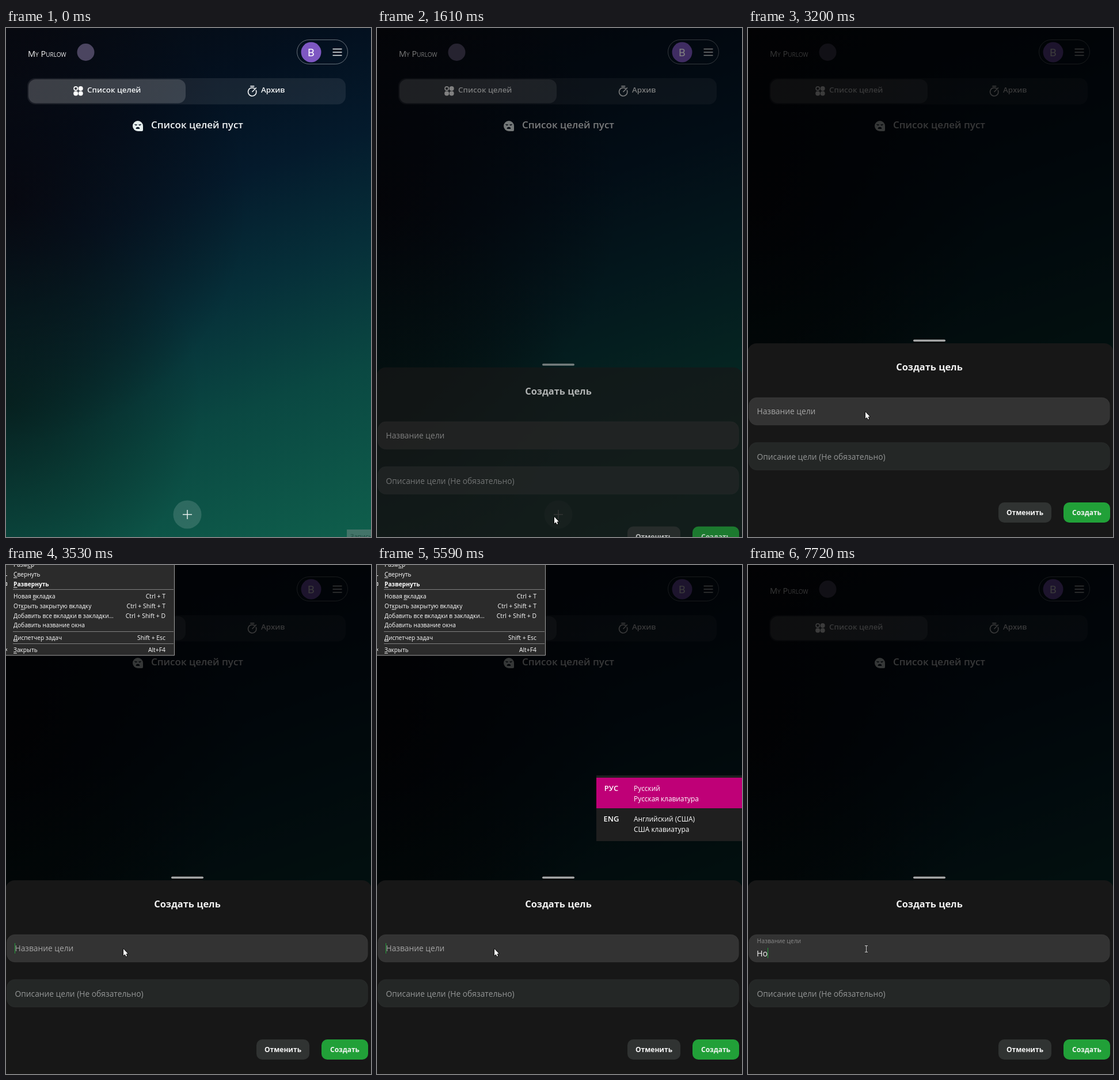
Recreate the animation shown at these times as an HTML page with a canvas. Size 634 by 883 pixels, loop 8000 ms.

```html
<!DOCTYPE html>
<html lang="ru">
<head>
<meta charset="utf-8">
<title>Список целей</title>
<style>
html, body { margin: 0; width: 100%; height: 100%; overflow: hidden; background: #05080f; }
canvas { display: block; }
</style>
</head>
<body>
<canvas id="stage" width="634" height="883"></canvas>
<script>
const W = 634, H = 883, LOOP = 8000;
const c = document.getElementById('stage').getContext('2d');
const UI = '"Open Sans", "Noto Sans", sans-serif';
const clamp = v => Math.max(0, Math.min(1, v));
const ramp = (t, a, b) => clamp((t - a) / (b - a));
const easeOut = (p, k) => 1 - Math.pow(1 - p, k);
const white = a => `rgba(255,255,255,${a})`;

function box(x, y, w, h, r, fill, stroke) {
  c.beginPath();
  c.roundRect(x, y, w, h, r);
  if (fill) { c.fillStyle = fill; c.fill(); }
  if (stroke) { c.strokeStyle = stroke; c.lineWidth = 1; c.stroke(); }
}
function disc(x, y, r, fill) {
  c.beginPath();
  c.arc(x, y, r, 0, 7);
  c.fillStyle = fill;
  c.fill();
}
function line(color, width, ...pts) {
  c.beginPath();
  for (let i = 0; i < pts.length; i += 2) c.lineTo(pts[i], pts[i + 1]);
  c.strokeStyle = color;
  c.lineWidth = width;
  c.stroke();
}
function text(s, x, y, size, color, weight = 400, align = 'left', family = UI) {
  c.font = `${weight} ${size}px ${family}`;
  c.fillStyle = color;
  c.textAlign = align;
  c.fillText(s, x, y);
}

function shade(x, y, r, rgb, alpha) {
  const g = c.createRadialGradient(x, y, 0, x, y, r);
  g.addColorStop(0, `rgba(${rgb},${alpha})`);
  g.addColorStop(.4, `rgba(${rgb},${alpha * .6})`);
  g.addColorStop(1, `rgba(${rgb},0)`);
  c.fillStyle = g;
  c.fillRect(0, 0, W, H);
}
function background() {
  const g = c.createLinearGradient(0, 0, 358, 984);
  [[0, '#070a11'], [.2, '#03101f'], [.36, '#041a2c'], [.54, '#062f39'],
   [.73, '#0a4842'], [1, '#0f5f4c']].forEach(s => g.addColorStop(...s));
  c.fillStyle = g;
  c.fillRect(0, 0, W, H);
  shade(0, 300, 420, '8,4,9', .75);
  shade(0, 650, 340, '6,22,16', .6);
}

function brand() {
  text('My Purlow', 38, 50, 14.5, '#f0f0f0', 'small-caps 400');
  disc(138.5, 42, 15, '#4b4560');
}

function profile() {
  box(505.5, 20.5, 88, 42, 21, null, white(.4));
  disc(530, 42, 17.5, '#7e57c2');
  text('B', 530, 49, 19, '#fff', 400, 'center', 'Roboto, sans-serif');
  for (const y of [36.5, 42, 47.5]) line('#eee', 1.5, 567.5, y, 583.5, y);
}

function tabs() {
  box(37, 87, 553, 45.5, 14, white(.08));
  box(39, 89, 273, 41.5, 13, white(.15));
  c.beginPath();
  c.arc(121.2, 105, 3.1, 0, 7);
  c.strokeStyle = '#fff';
  c.lineWidth = 1.7;
  c.stroke();
  for (const [x, y] of [[129.7, 105], [121.2, 113.6], [129.7, 113.6]]) disc(x, y, 4, '#fff');
  text('Список целей', 141, 112, 13.4, '#f2f4f6', 600);
  c.beginPath();
  c.arc(427.7, 110.8, 7.2, -.45, 5.35);
  c.strokeStyle = '#f2f4f6';
  c.lineWidth = 1.7;
  c.stroke();
  line('#f2f4f6', 1.7, 424.3, 101, 431.3, 101);
  line('#f2f4f6', 1.7, 427.5, 111, 434.8, 103.5);
  text('Архив', 443, 112, 13.4, '#f2f4f6', 600);
}

function emptyNote() {
  const pale = '#e6eeee', ink = '#0a1624';
  disc(229, 170, 9, pale);
  box(229, 170, 9, 9, [0, 0, 2, 0], pale);
  line(ink, 1.3, 223.5, 167, 225.7, 168.6, 227.6, 167.4);
  line(ink, 1.3, 230.6, 167.4, 232.4, 168.6, 234.6, 167);
  c.beginPath();
  c.arc(229, 175, 3.3, Math.PI, 0);
  c.fillStyle = ink;
  c.fill();
  text('Список целей пуст', 252, 173.5, 17, '#f2f4f6', 600);
}

function addButton(hover) {
  disc(315, 844, hover ? 25.3 : 24.5, white(.14));
  line('#e8efee', 1.5, 307, 844, 323, 844);
  line('#e8efee', 1.5, 315, 836, 315, 852);
}

function button(x, w, label, fill) {
  box(x, 823, w, 35, 10, fill);
  text(label, x + w / 2, 845, 12, '#f5f5f5', 700, 'center');
}

function sheet(t) {
  const p = ramp(t, 1340, 2140);
  if (!p) return;
  c.fillStyle = `rgba(0,0,0,${.77 * easeOut(p, 2.5)})`;
  c.fillRect(0, 0, W, H);
  c.save();
  c.globalAlpha = easeOut(p, 3);
  c.translate(0, 345 * (1 - easeOut(p, 5.1)));
  box(287, 540.5, 56, 3.5, 2, '#a6a6a6');
  box(-1, 547, 636, 700, [16, 16, 0, 0], '#171717');
  text('Создать цель', 315, 594, 16.4, '#f2f2f2', 700, 'center');

  const lit = Math.round(38 + 13 * ramp(t, 1960, 2100));
  box(1.5, 641, 627, 48, 14, `rgb(${lit},${lit},${lit})`, white(.03));
  box(1.5, 719, 627, 48, 14, '#242726', white(.03));
  text('Описание цели (Не обязательно)', 15.5, 749, 13.8, '#949696');
  const lift = t < 7390 ? 0 : t < 7450 ? .5 : 1;
  text('Название цели', 15.5, 670 - 14 * lift, 13.8 - 3.4 * lift, lift ? '#8a8a8a' : '#a5a5a5');

  const typed = t < 7390 ? '' : t < 7720 ? 'Н' : 'Но';
  text(typed, 15, 679, 14.3, '#f4f4f4');
  const end = 15.5 + c.measureText(typed).width;
  const blinks = [2470, 3000, 3530, 4000, 4540, 5060, 5590, 6130, 6660, 7190, 7390];
  if (blinks.filter(b => t >= b).length % 2) {
    c.fillStyle = '#21a038';
    c.fillRect(Math.floor(end), typed ? 664 : 656, 1, 18);
  }
  button(435, 92, 'Отменить', '#303332');
  button(548, 81, 'Создать', '#21a038');
  c.restore();
}

// Underlines the letter that follows "&".
function menuItem(label, y, keys, weight) {
  const at = label.indexOf('&'), s = label.replace('&', '');
  text(s, 13, y, 10.2, '#fff', weight);
  if (at >= 0) {
    const x = 13 + c.measureText(s.slice(0, at)).width;
    c.fillRect(x, y + 1.5, c.measureText(s[at]).width, 1);
  }
  if (keys) text(keys, 277, y, 10.4, '#fff', 400, 'right');
}

function windowMenu() {
  box(-2, -2, 294.5, 158.8, 0, '#2b2b2b', '#a0a0a0');
  menuItem('Разм&ер', 3);
  menuItem('&Свернуть', 20);
  menuItem('&Развернуть', 37, '', 700);
  menuItem('Новая &вкладка', 58, 'Ctrl + T');
  menuItem('От&крыть закрытую вкладку', 75, 'Ctrl + Shift + T');
  menuItem('Добавить все вкладки в закладки…', 91.5, 'Ctrl + Shift + D');
  menuItem('Добавить название окна', 108);
  menuItem('&Диспетчер задач', 130, 'Shift + Esc');
  menuItem('&Закрыть', 151, 'Alt+F4');
  for (const y of [42.5, 115.5, 136.5]) line('#808080', 1, 12, y, 291, y);
  line('#fff', 1, 0, 18.5, 2, 18.5);
  line('#fff', 1, 0, 30.5, 1.5, 30.5, 1.5, 35.5, 0, 35.5);
  line('#fff', 1, 2, 145, 0, 147, 2, 149);
}

function layoutPicker(russian) {
  c.fillStyle = '#1f1f1f';
  c.fillRect(381, 365, 253, 114);
  c.fillStyle = '#bf0077';
  c.fillRect(381, russian ? 369 : 422, 253, 53);
  [['РУС', 'Русский', 'Русская клавиатура'],
   ['ENG', 'Английский (США)', 'США клавиатура']].forEach(([code, name, kind], i) => {
    const y = 392 + 53 * i;
    text(code, 407, y, 13, '#fff', 600, 'center');
    text(name, 446, y, 11.9, '#fff');
    text(kind, 446, y + 17.5, 11.9, '#fff');
  });
}

function shape(x, y, pts) {
  c.beginPath();
  for (let i = 0; i < pts.length; i += 2) c.lineTo(x + pts[i], y + pts[i + 1]);
  c.closePath();
  c.lineJoin = 'round';
  c.strokeStyle = '#000';
  c.lineWidth = 1.6;
  c.stroke();
  c.fillStyle = '#fff';
  c.fill();
  c.lineJoin = 'miter';
}
const ARROW = [0, 0, 0, 11.5, 2.6, 9.2, 4.5, 13, 6.2, 12.2, 4.4, 8.5, 7.8, 8.3];
const HAND = [-1, 0, 1, 0, 1.2, 5, 3.5, 5, 5.5, 5.8, 7, 7, 6.6, 10.5, 5, 14.5,
  -1.5, 14.5, -4.5, 9.5, -4.8, 7.5, -3.2, 7.2, -1.2, 9];

function beam(x, y) {
  line('#c8c8c8', 1, x, y - 5, x, y + 5);
  for (const e of [-5.5, 5.5]) line('#c8c8c8', 1, x - 2.5, y + e, x + 2.5, y + e);
}
const click = (x, y) => disc(x, y, 10.3, 'rgba(190,190,0,.7)');

function pointer(t) {
  if (t < 520) return;
  if (t < 1340) {
    const p = easeOut(ramp(t, 500, 1200), 1.7);
    const x = 568 - 261 * p, y = 879 - 30 * p;
    if (t >= 1270) click(306, 848);
    shape(x, y, x < 338 ? HAND : ARROW);
  } else if (t < 2280) {
    const p = ramp(t, 1800, 2140), s = p * p * (3 - 2 * p);
    const x = 308 - 102 * s, y = 848 - 166 * s;
    if (y < 689) beam(x, y); else shape(x, y, ARROW);
  } else if (t >= 3200 && t < 6330) {
    shape(204, 666, ARROW);
  } else {
    if (t >= 2340 && t < 2540 || t >= 6330 && t < 6460) click(203.5, 665);
    beam(205.5, 666);
  }
}

function tooltip() {
  c.fillStyle = '#437469';
  c.fillRect(592, 870, 42, 13);
  text('Запись', 598, 886, 11, '#1d4a40');
}

function draw(t) {
  background();
  brand();
  profile();
  tabs();
  emptyNote();
  addButton(t >= 1070 && t < 1400);
  if (t < 70) tooltip();
  sheet(t);
  if (t >= 3260 && t < 6330) windowMenu();
  if (t >= 4330 && t < 5790) layoutPicker(t >= 5330);
  pointer(t);
}

const start = performance.now();
function tick() {
  draw((performance.now() - start) % LOOP);
  requestAnimationFrame(tick);
}
tick();
</script>
</body>
</html>
```
